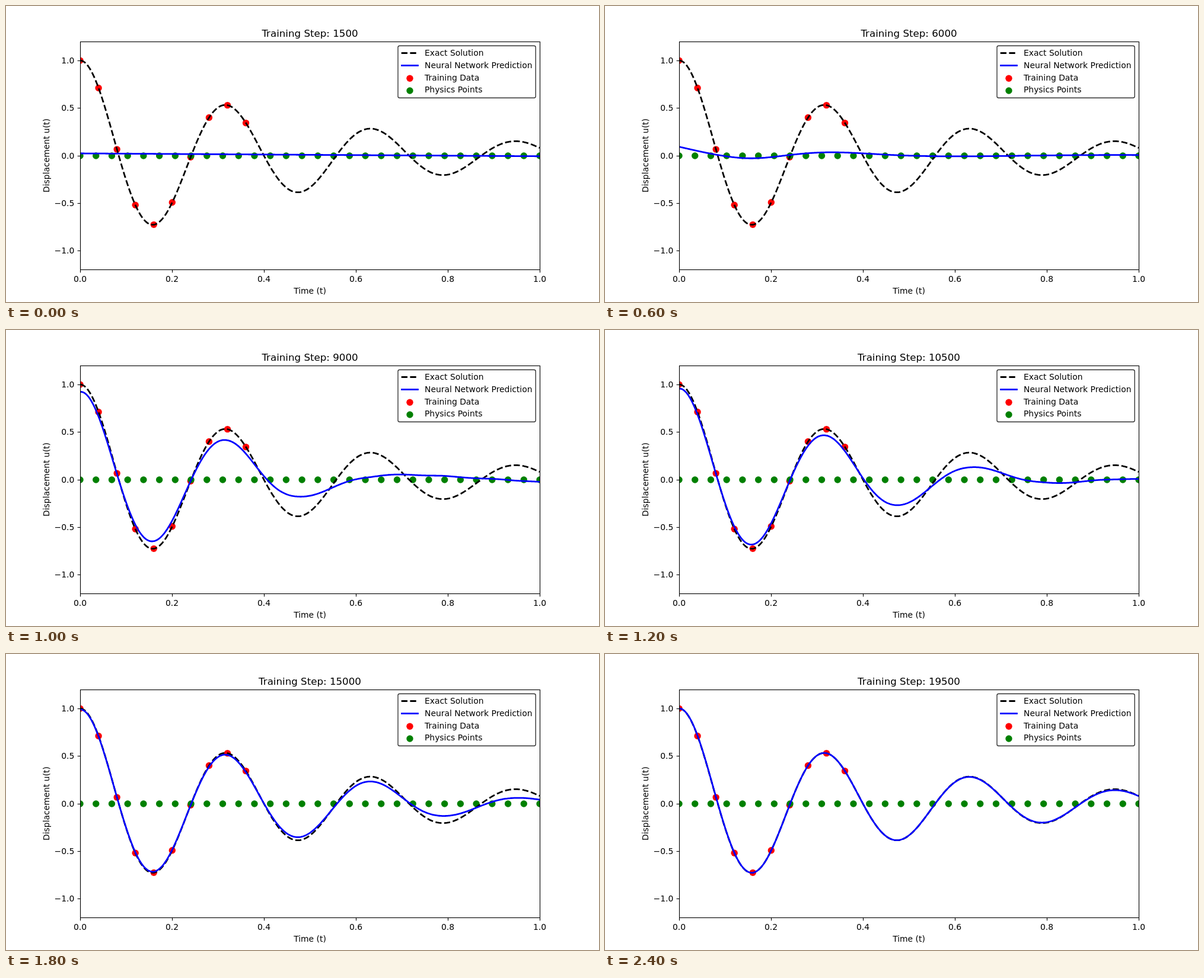
Recreate the animation shown at these times as an HTML page with a canvas. Size 1000 by 500 pixels, loop 2.6 s.

```html
<!DOCTYPE html>
<html lang="en">
<head>
<meta charset="utf-8">
<title>Oscillator training</title>
<style>
  html, body { margin: 0; width: 100%; height: 100%; overflow: hidden; background: #fff; }
  canvas { display: block; }
</style>
</head>
<body>
<canvas id="stage" width="1000" height="500"></canvas>
<script>
const ctx = document.getElementById('stage').getContext('2d');
const STEP_MS = 200, STEPS = 13;
const LEFT = 125, TOP = 60, WIDTH = 775, HEIGHT = 385;
const DASH = [10.28, 4.44];
const px = t => LEFT + t * WIDTH;
const py = u => 252.5 - u * HEIGHT / 2.4;

// Underdamped oscillator
const DAMP = 2, OMEGA = Math.sqrt(396);
const exact = t => Math.exp(-DAMP * t) * (Math.cos(OMEGA * t) + DAMP / OMEGA * Math.sin(OMEGA * t));
const KNOT = Math.PI / OMEGA / 2;

// Natural cubic spline on knots a quarter period apart
function spline(y) {
  const n = y.length - 1, m = y.map(() => 0);
  for (let pass = 0; pass < 30; pass++) {
    for (let i = 0; i <= n; i++) {
      if (i === 0) m[i] = (3 * (y[1] - y[0]) - m[1]) / 2;
      else if (i === n) m[i] = (3 * (y[n] - y[n - 1]) - m[n - 1]) / 2;
      else m[i] = (3 * (y[i + 1] - y[i - 1]) - m[i - 1] - m[i + 1]) / 4;
    }
  }
  return t => {
    const i = Math.min(n - 1, Math.floor(t / KNOT)), s = t / KNOT - i, r = 1 - s;
    return r * r * (1 + 2 * s) * y[i] + s * s * (1 + 2 * r) * y[i + 1]
      + s * r * (r * m[i] - s * m[i + 1]);
  };
}
const nearExact = error => {
  const e = spline(error);
  return t => exact(t) + e(t);
};

// Network output at some training steps: [index, curve]
const stages = [
  [0, t => 0.022 - 0.03 * t],
  [2, t => 0.043 - 0.165 * t + 0.19 * t * t - 0.064 * t * t * t],
  [4, spline([.265, -.065, -.211, -.035, .12, .095, .012, -.03, -.035, -.018, .001, .012, .0125, .003])],
  [5, nearExact([-.078, -.01, .078, .008, -.116, .02, .208, -.045, -.258, .027, .245, .029, -.162, -.041])],
  [7, nearExact([-.02, -.005, .021, .002, -.033, -.003, .057, -.016, -.087, .031, .133, -.034, -.142, .018])],
  [9, nearExact([-.01, 0, .011, 0, -.018, 0, .033, -.006, -.051, .003, .075, -.015, -.092, .005])],
  [12, nearExact([0, .004, 0, 0, 0, 0, .001, 0, -.003, 0, .005, -.002, -.01, .006])]
];
// Share of the next stage for indices that fall between two stages
const blend = { 1: .5, 3: .22, 6: .6, 8: .6, 10: .45, 11: .75 };

function prediction(index) {
  const next = stages.findIndex(s => s[0] >= index);
  const curve = stages[next][1];
  if (stages[next][0] === index) return curve;
  const before = stages[next - 1][1], w = blend[index];
  return t => before(t) * (1 - w) + curve(t) * w;
}
const curves = Array.from({ length: STEPS }, (_, i) => prediction(i));

function text(str, x, y, align = 'center', size = 13.89) {
  ctx.font = `${size}px "DejaVu Sans", sans-serif`;
  ctx.textAlign = align;
  ctx.fillStyle = '#000';
  ctx.fillText(str, x, y);
}

function dot(x, y, color) {
  ctx.fillStyle = color;
  ctx.beginPath();
  ctx.arc(x, y, 5.7, 0, 2 * Math.PI);
  ctx.fill();
}

function stroke(points, color, width, dash = [], cap = 'butt') {
  ctx.strokeStyle = color;
  ctx.lineWidth = width;
  ctx.lineCap = cap;
  ctx.lineJoin = 'round';
  ctx.setLineDash(dash);
  ctx.beginPath();
  for (const [x, y] of points) ctx.lineTo(x, y);
  ctx.stroke();
  ctx.setLineDash([]);
}
const solid = points => stroke(points, '#00f', 2.78, [], 'square');
const dashed = points => stroke(points, '#000', 2.78, DASH);
const plot = f => Array.from({ length: 500 }, (_, i) => [px(i / 499), py(f(i / 499))]);

function axes() {
  ctx.strokeStyle = '#000';
  ctx.lineWidth = 1.11;
  ctx.lineJoin = 'miter';
  ctx.strokeRect(LEFT + .5, TOP + .5, WIDTH, HEIGHT);
  for (let i = 0; i <= 5; i++) {
    const x = px(i / 5);
    stroke([[x + .5, 445.5], [x + .5, 450.4]], '#000', 1.11);
    text((i / 5).toFixed(1), x, 466);
  }
  for (let u = -1; u <= 1; u += .5) {
    const y = Math.round(py(u));
    stroke([[120.6, y + .5], [125.5, y + .5]], '#000', 1.11);
    text(u.toFixed(1).replace('-', '\u2212'), 115.3, y + 5, 'right');
  }
  text('Time (t)', 512.5, 486);
  ctx.save();
  ctx.translate(73, 252.5);
  ctx.rotate(-Math.PI / 2);
  text('Displacement u(t)', 0, 0);
  ctx.restore();
}

function legend() {
  ctx.beginPath();
  ctx.roundRect(661, 67.2, 232.2, 88, 2.78);
  ctx.fillStyle = 'rgba(255,255,255,.8)';
  ctx.fill();
  ctx.strokeStyle = 'rgba(0,0,0,.8)';
  ctx.lineWidth = 1.39;
  ctx.stroke();
  dashed([[666.7, 79.5], [694.5, 79.5]]);
  solid([[667.5, 100.5], [694.5, 100.5]]);
  dot(681, 122.2, '#f00');
  dot(681, 143, '#008000');
  ['Exact Solution', 'Neural Network Prediction', 'Training Data', 'Physics Points']
    .forEach((label, i) => text(label, 706, [84, 105, 126, 146][i], 'left'));
}

function draw(index) {
  ctx.fillStyle = '#fff';
  ctx.fillRect(0, 0, 1000, 500);
  ctx.save();
  ctx.beginPath();
  ctx.rect(LEFT, TOP, WIDTH + 1, HEIGHT + 1);
  ctx.clip();
  for (let i = 0; i < 10; i++) {
    const t = i * 20 / 499;
    dot(px(t), py(exact(t)), '#f00');
  }
  for (let i = 0; i < 30; i++) dot(px(i / 29), 253, '#008000');
  dashed(plot(exact));
  solid(plot(curves[index]));
  ctx.restore();
  axes();
  legend();
  text(`Training Step: ${1500 * (index + 1)}`, 512.5, 52, 'center', 16.67);
}

const start = performance.now();
function tick() {
  draw(Math.floor((performance.now() - start) / STEP_MS) % STEPS);
  requestAnimationFrame(tick);
}
tick();
</script>
</body>
</html>
```
